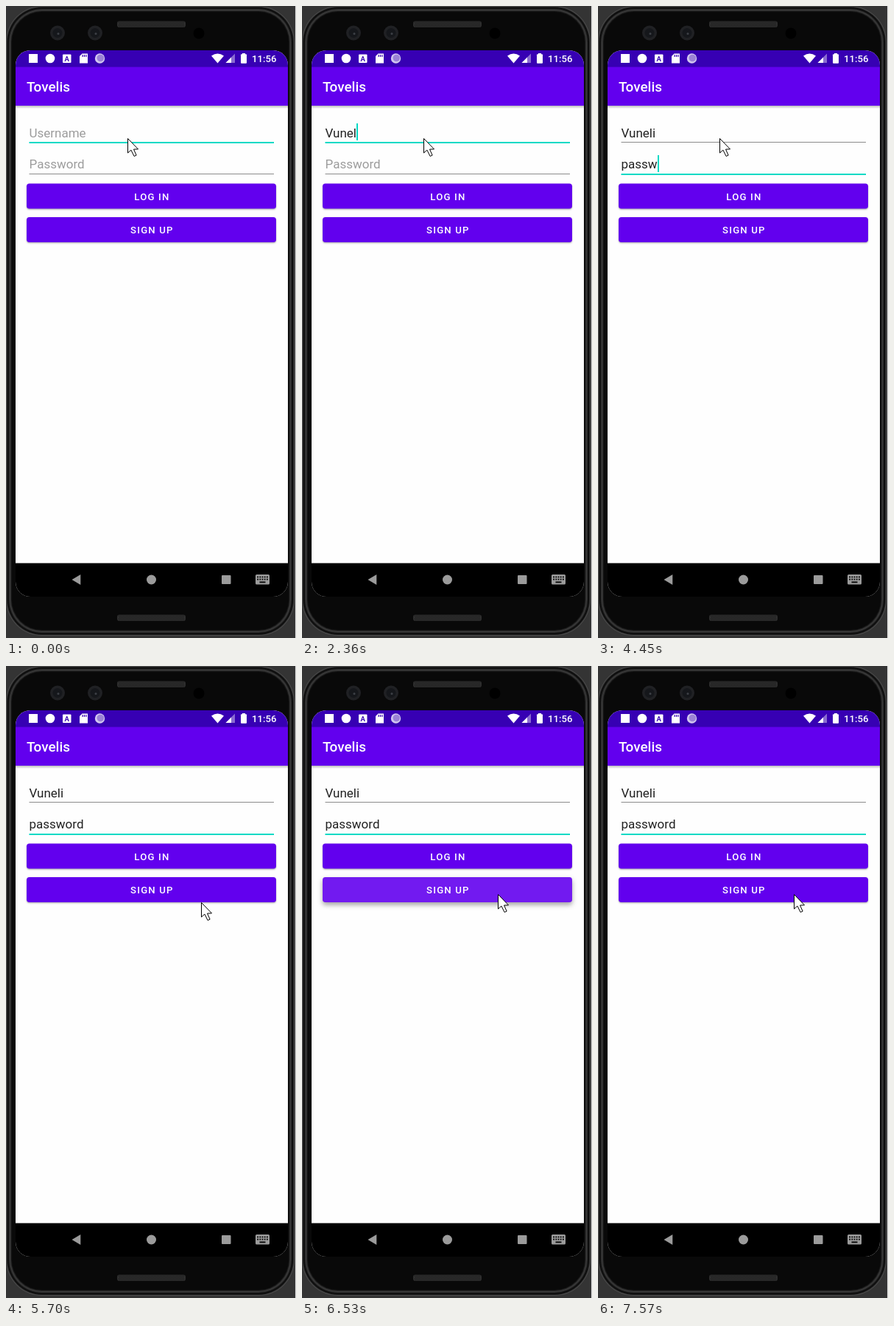
An HTML page with a canvas for the animation above (8000 ms loop, 394x856 px).

```html
<!DOCTYPE html>
<html lang="en">
<head>
<meta charset="utf-8">
<title>Login form</title>
<style>
html, body { margin: 0; width: 100%; height: 100%; overflow: hidden; background: #333; }
canvas { display: block; width: 394px; height: 856px; }
</style>
</head>
<body>
<canvas id="stage" width="394" height="856"></canvas>
<script>
const W = 394, H = 856, LOOP = 8000;
const TEAL = '#03dac5', PURPLE = '#6200ee', DARK_PURPLE = '#3700b3', GREY = '#9b9b9b';
const FOCUS_USER = 290, FOCUS_PASS = 3100, MOVE = 5160, PRESS = 6250;
const BLINK = 530, MOVE_STEP = 135, MOVE_COUNT = 7;
const g = document.getElementById('stage').getContext('2d');

// typing bursts
const userKeys = [
  { start: 1030, gap: 150, keys: 'Vu' },
  { start: 1470, gap: 150, keys: 'n' },
  { start: 2210, gap: 150, keys: 'eli' },
];
const passKeys = [
  { start: 3870, gap: 93, keys: 'pass' },
  { start: 4450, gap: 143, keys: 'word' },
];

const clamp = v => Math.min(1, Math.max(0, v));

// text typed by time t, and the time of the last key
function typed(bursts, t, focusTime) {
  let value = '', last = focusTime;
  for (const { start, gap, keys } of bursts) {
    if (t < start) break;
    const count = Math.min(keys.length, Math.floor((t - start) / gap) + 1);
    value += keys.slice(0, count);
    last = start + (count - 1) * gap;
  }
  return { value, last };
}

function caretOn(t, since) {
  return t >= since && Math.floor((t - since) / BLINK) % 2 === 0;
}

function bezier(u, a, b, c, d) {
  const v = 1 - u;
  return v * v * v * a + 3 * v * v * u * b + 3 * v * u * u * c + u * u * u * d;
}

function pointerAt(t) {
  const step = Math.floor((t - MOVE) / MOVE_STEP) + 1;
  const u = clamp(step / MOVE_COUNT);
  return [bezier(u, 165, 514, 170, 266), bezier(u, 179, 300, 344, 309)].map(Math.round);
}

function pressAt(t) {
  const spread = clamp((t - PRESS + 60) / 280);
  const fade = 1 - clamp((t - PRESS - 340) / 240);
  return { radius: 400 * spread * (2 - spread), tint: .1 * fade, lift: Math.min(spread, fade) };
}

function rect(x, y, w, h, color) {
  g.fillStyle = color;
  g.fillRect(x, y, w, h);
}

function roundPath(x, y, w, h, r) {
  g.beginPath();
  g.roundRect(x, y, w, h, r);
}

function round(x, y, w, h, r, color) {
  roundPath(x, y, w, h, r);
  g.fillStyle = color;
  g.fill();
}

function disc(x, y, r, color) {
  g.beginPath();
  g.arc(x, y, r, 0, Math.PI * 2);
  g.fillStyle = color;
  g.fill();
}

function poly(points, color) {
  g.beginPath();
  points.forEach(([x, y]) => g.lineTo(x, y));
  g.closePath();
  g.fillStyle = color;
  g.fill();
}

function text(str, x, y, size, color, weight = 400, align = 'left') {
  g.font = `${weight} ${size}px Roboto, sans-serif`;
  g.textAlign = align;
  g.fillStyle = color;
  g.fillText(str, x, y);
}

function speaker(y) {
  round(151, y, 93, 8.5, 3, '#2d2d2d');
  g.fillStyle = '#191919';
  for (let row = 0; row < 4; row++)
    for (let x = 153 + row % 2; x < 242; x += 2) g.fillRect(x, y + 1 + row * 2, 1, 1);
}

function lens(x, y) {
  disc(x, y, 10, '#202124');
  disc(x, y, 6.5, '#15171b');
  disc(x + 1, y + 1, 1.5, '#3d4046');
}

function body() {
  rect(0, 0, W, H, '#343434');
  rect(W - 1, 0, 1, H, '#d8d8d8');
  // rim: nested outlines, brightest on the edge and a few pixels in
  for (let i = 0; i <= 9; i++) {
    const light = 9 + 66 * Math.exp(-i * i) + 50 * Math.exp(-((i - 5) ** 2) / 2.5);
    round(i, i, 392 - 2 * i, 853 - 2 * i, 49 - i, `rgb(${light},${light},${light})`);
  }
  speaker(20.5);
  speaker(824.5);
  lens(70, 36.5);
  lens(121, 36.5);
  disc(262, 37, 7.5, '#000');
}

function statusBar() {
  rect(13, 60, 370, 23, DARK_PURPLE);
  rect(31, 65, 12, 12, '#fff');
  disc(60, 71, 6.3, '#fff');
  round(77, 65.5, 11.5, 11.5, 1, '#fff');
  text('A', 82.8, 74.8, 9.5, DARK_PURPLE, 700, 'center');
  poly([[103.5, 64.5], [111, 64.5], [111, 77.5], [100, 77.5], [100, 68]], '#fff');
  for (let i = 0; i < 3; i++) rect(103.5 + i * 2.4, 66, 1.2, 3, DARK_PURPLE);
  disc(127.5, 71, 6.7, '#d2c7ef');
  disc(128.3, 70.5, 4.8, '#9b82d6');

  g.beginPath();
  g.moveTo(287.5, 77.5);
  g.lineTo(279, 67.5);
  g.quadraticCurveTo(287.5, 61.5, 296, 67.5);
  g.fillStyle = '#fff';
  g.fill();
  poly([[298.5, 77], [311, 64.5], [311, 77]], '#8a6bd1');
  poly([[298.5, 77], [306, 69.5], [306, 77]], '#fff');
  rect(321, 64, 4, 2, '#fff');
  round(319, 65.3, 8, 12.5, 1, '#fff');
  text('11:56', 334, 76, 13.2, '#fff', 500);
}

function appBar() {
  const shade = g.createLinearGradient(0, 135, 0, 139);
  shade.addColorStop(0, '#b9b9bd');
  shade.addColorStop(1, '#fefefe');
  rect(13, 135, 370, 4, shade);
  rect(13, 82.6, 370, 52.4, PURPLE);
  text('Tovelis', 28, 116, 18.9, '#fff', 500);
}

function navBar() {
  rect(13, 754.6, 370, 45.4, '#000');
  poly([[89.5, 777], [101.3, 770], [101.3, 784]], GREY);
  disc(197.5, 777, 6.5, GREY);
  round(293, 771, 12.5, 12, 1, GREY);
  round(339, 770, 19, 13.5, 1.5, GREY);
  for (let row = 0; row < 2; row++)
    for (let i = 0; i < 5; i++) rect(341.2 + i * 3.2, 772.5 + row * 3.2, 1.8, 1.8, '#000');
  rect(344.5, 779.5, 8, 1.8, '#000');
}

function field(y, hint, value, focused, caret) {
  text(value || hint, 31.5, Math.floor(y + 20), 17, value ? '#212121' : '#9c9c9c');
  const line = Math.round(y + 26);
  if (focused) rect(31.5, line, 332.5, 2, TEAL);
  else rect(31.5, line, 332.5, 1, '#8c8c8c');
  if (caret) rect(Math.round(31.7 + g.measureText(value).width), Math.round(y + 1), 2, 23, TEAL);
}

function button(y, label, press) {
  const lift = press ? press.lift : 0;
  g.save();
  g.shadowColor = `rgba(0,0,0,${.3 + lift * .06})`;
  g.shadowBlur = 2 + lift * 4;
  g.shadowOffsetY = 1.2 + lift * 2.3;
  round(28, y, 339, 34, 3.8, PURPLE);
  g.restore();
  if (press) {
    g.save();
    roundPath(28, y, 339, 34, 3.8);
    g.clip();
    disc(266, 309, press.radius, `rgba(255,255,255,${press.tint})`);
    g.restore();
  }
  g.letterSpacing = '1.18px';
  text(label, 198.4, y + 22, 13.2, '#fff', 500, 'center');
  g.letterSpacing = '0px';
}

function pointer([x, y]) {
  g.save();
  g.translate(x + .5, y + .5);
  poly([[0, 0], [0, 19.5], [4.4, 15.6], [8.6, 24], [11.6, 22.6], [8, 14.6], [14, 14.4]], '#fff');
  g.strokeStyle = '#000';
  g.lineWidth = 1;
  g.stroke();
  g.restore();
}

function draw(t) {
  const inPass = t >= FOCUS_PASS;
  const user = typed(userKeys, t, FOCUS_USER);
  const pass = typed(passKeys, t, FOCUS_PASS);
  body();
  g.save();
  roundPath(13, 60, 370, 740, 20);
  g.clip();
  rect(13, 60, 370, 740, '#fefefe');
  statusBar();
  appBar();
  field(158, 'Username', user.value, !inPass, !inPass && caretOn(t, user.last));
  field(200.6, 'Password', pass.value, inPass, inPass && caretOn(t, pass.last));
  button(240.5, 'LOG IN');
  button(286, 'SIGN UP', pressAt(t));
  navBar();
  g.restore();
  pointer(pointerAt(t));
}

const start = performance.now();
function tick() {
  draw((performance.now() - start) % LOOP);
  requestAnimationFrame(tick);
}
tick();
</script>
</body>
</html>
```
